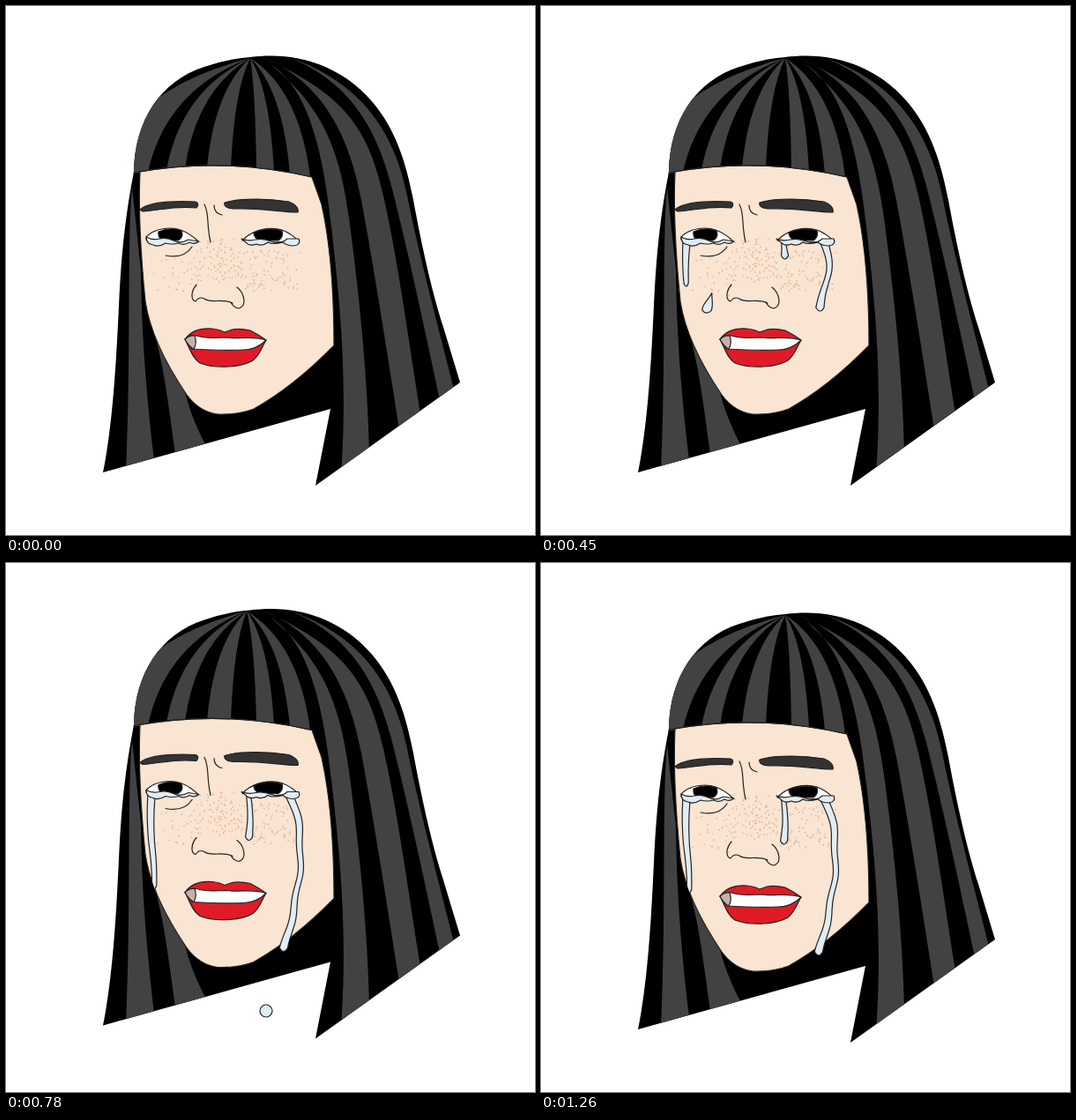
Recreate the animation shown at these times as an HTML page. Size 600 px wide and 600 px high, loop 1.29 s.

```html
<!DOCTYPE html>
<html lang="en">
<head>
<meta charset="utf-8">
<title>Crying face</title>
<style>
  html, body { margin: 0; width: 100%; height: 100%; overflow: hidden; background: #fff; }
  svg { display: block; width: 100%; height: 100%; }
  .grey { fill: #424242; }
  .skin { fill: #fae4d2; }
  .ink { stroke: #222; stroke-width: 1.2; stroke-linejoin: round; stroke-linecap: round; }
  .line { fill: none; }
  .tear { fill: #e1edf3; }
</style>
</head>
<body>
<svg viewBox="0 0 600 600">
  <defs>
    <path id="hair" d="M145 188C146 130 175 85 225 69Q250 60 277 58C330 51 380 68 414 107C443 140 454 180 462 220C474 285 485 330 496 364L515 427L351 544L368 457L110 529C121 475 125 405 128 340C131 275 136 235 145 188Z"/>
    <path id="face" d="M152 188C150 230 153 285 158 335C163 368 180 404 205 441Q219 460 240 463Q262 464 281 457Q326 432 372 385C372 330 368 270 358 225L347 194Q246 171 152 188Z"/>
    <clipPath id="inHair"><use href="#hair"/></clipPath>
    <clipPath id="inFace"><use href="#face"/></clipPath>
  </defs>
  <g id="head">
    <use href="#hair"/>
    <g clip-path="url(#inHair)" class="grey">
      <path d="M300 66C345 95 360 170 369 250S388 420 380 530L412 505C410 420 401 330 389 240S352 110 300 66Z"/>
      <path d="M290 58C360 85 390 150 403 220S432 390 446 480L470 462C458 390 445 290 428 215S385 100 290 58Z"/>
      <path d="M320 58C390 85 420 140 436 200S478 380 492 447L508 435C492 370 470 290 455 215S400 85 320 58Z"/>
      <path d="M143 205C137 270 142 400 136 525L168 515C158 430 154 370 153 300Z"/>
      <path d="M166 365C178 400 184 450 192 508L226 497C212 470 206 450 203 438Z"/>
      <path id="fringe"/>
    </g>
    <use href="#face" class="skin ink"/>
    <path class="ink line" d="M145 189Q246 170.500 347 194"/>
    <g id="freckles" stroke="#d8ab87" stroke-width="1.3" stroke-linecap="round" opacity=".75"></g>

    <g fill="#333" class="ink">
      <path d="M152 231C162 222 190 221 215 222Q220 224 216 229C192 226 174 232 155 233Z"/>
      <path d="M248 223C268 217 300 219 321 222Q333 227 331 234C312 234 288 229 262 230Q246 230 248 223Z"/>
    </g>
    <g class="ink line">
      <path d="M225 225C231 236 227 247 232 268M236 226Q236 235 245 237M181 283Q202 287 211 273"/>
      <path d="M216 316C210 323 209 333 215 335Q219 329 225 332C232 338 246 331 257 337M262 319C270 325 274 340 264 343Q258 342 255 336"/>
    </g>

    <g class="ink">
      <path fill="#fff" d="M159 262C168 252 187 250 198 254Q209 258 218 267Q190 270 159 265Z"/>
      <path fill="#000" d="M173 256Q187 250 199 255Q202 262 195 266H178Q172 263 173 256Z"/>
      <path fill="#fff" d="M268 266C280 253 300 250 313 254Q325 259 331 266Q300 270 268 266Z"/>
      <path fill="#000" d="M281 257Q298 250 313 255Q315 262 309 266H288Q281 263 281 257Z"/>
    </g>

    <g class="ink tear">
      <path clip-path="url(#inFace)" id="left"/>
      <path id="mid"/>
      <path id="right"/>
      <g clip-path="url(#inFace)"><path id="roll" d="M3 -13C4 -5 7 1 5 7Q0 13 -5 8C-7 2 0 -4 3 -13Z"/></g>
      <path d="M159 262Q166 266 174 264T190 266T207 265L219 267Q214 271 208 268Q202 272 196 269Q188 271 181 269Q173 274 167 271Q159 270 159 262Z"/>
      <path d="M267 264Q275 267 283 265T301 267T319 264L332 264Q335 271 326 272Q319 272 314 268Q303 271 297 268Q291 273 284 270Q276 273 272 268Z"/>
    </g>

    <g class="ink">
      <path fill="#df1b27" d="M203 378C210 368 222 365 234 366Q243 367 248 370C256 366 268 366 277 368Q287 373 295 379C290 387 288 396 280 402C265 411 235 411 220 405C211 399 208 387 203 378Z"/>
      <path fill="#fff" d="M203 378Q209 373 216 374C228 378 240 376 250 376C268 378 282 374 295 379Q284 390 269 390C248 391 228 390 211 389Z"/>
      <path fill="#c2b2aa" d="M203 378Q208 373 214 374Q217 382 213 389Q207 386 203 378Z"/>
    </g>
  </g>
  <circle id="drip" class="ink tear"/>
</svg>
<script>
const STEP = 30, STEPS = 43;
const $ = id => document.getElementById(id);
const clamp = v => Math.max(0, Math.min(1, v));

// Piecewise linear track of [time, value] pairs.
function track(keys, t) {
  let i = 1;
  while (i < keys.length - 1 && t > keys[i][0]) i++;
  const [a, x] = keys[i - 1], [b, y] = keys[i];
  return x + (y - x) * clamp((t - a) / (b - a));
}

function fringe(peak) {
  const edge = x => {
    const u = (x - 145) / 202;
    const y = 189 * (1 - u) ** 2 + 341 * u * (1 - u) + 194 * u * u;
    return { x, y: Math.min(y, 192) + 2, cx: peak + (x - peak) * .82 };
  };
  return [[105, 161], [182, 203], [228, 255], [284, 304], [322, 345]].map(([l, r]) => {
    const a = edge(l), b = edge(r);
    return `M${peak} 59Q${a.cx} 95 ${a.x} ${a.y}L${b.x} ${b.y}Q${b.cx} 95 ${peak} 59Z`;
  }).join('');
}

// A tear running down from y0 to y1 along centre(u), half as wide as width(u).
function stream(y0, y1, centre, width) {
  const len = y1 - y0;
  if (len < 3) return '';
  const n = Math.ceil(len / 5), l = [], r = [];
  for (let i = 0; i <= n; i++) {
    const u = i / n, y = y0 + u * (len - 4), x = centre(u, y), w = width(u);
    l.push(`${(x - w).toFixed(1)} ${y.toFixed(1)}`);
    r.unshift(`${(x + w).toFixed(1)} ${y.toFixed(1)}`);
  }
  const [ex, ey] = r[0].split(' ');
  return `M${l.join('L')}Q${centre(1, y1)} ${y1 + 4} ${ex} ${ey}L${r.join('L')}Z`;
}

function addFreckles() {
  let seed = 7, d = '';
  const rnd = () => (seed = seed * 16807 % 2147483647) / 2147483647;
  for (let i = 0; i < 210; i++) {
    const x = 167 + 88 * (rnd() + rnd());
    const top = x < 215 ? 284 : x < 268 ? 264 : 277;
    const y = top + rnd() * (x > 215 && x < 268 ? 50 : 46);
    d += `M${x.toFixed(1)} ${y.toFixed(1)}l${(rnd() * 1.6 - .8).toFixed(1)} ${(rnd() * 1.4).toFixed(1)}`;
  }
  $('freckles').innerHTML = `<path d="${d}"/>`;
}

const bobs = [0, .5, 1];
const drips = [
  { from: 720, to: 810, x: 295, y: 446, r: 7 },
  { from: 900, to: 990, x: 191, y: 425, r: 5 }
];

function draw(step) {
  const t = step * STEP, bob = bobs[step % 3];
  $('head').setAttribute('transform', `translate(0 ${-4.5 * bob})`);
  $('fringe').setAttribute('d', fringe(277 - 4 * bob));

  const leftEnd = track([[310, 268], [450, 318], [600, 352], [780, 374]], t);
  $('left').setAttribute('d', stream(266, leftEnd,
    (u, y) => 165 + Math.sin(y / 17) + Math.max(0, y - 320) * .06,
    u => 4.2 - 1.6 * u));

  const midEnd = track([[330, 268], [450, 287], [600, 306], [780, 319]], t);
  $('mid').setAttribute('d', stream(268, midEnd,
    (u, y) => 276 + Math.sin(y / 11),
    u => 2.6 + 1.4 * u * u));

  const rightEnd = track([[300, 268], [450, 346], [600, 428], [660, 445]], t);
  const bulge = 13 * (rightEnd - 268) / 160;
  $('right').setAttribute('d', stream(268, rightEnd,
    (u, y) => 322 - 6 * u + bulge * Math.sin(Math.PI * u ** .8) + 1.2 * Math.sin(y / 9),
    u => 4.6 - 1.6 * Math.sin(Math.PI * u)));

  const x = track([[210, 207], [270, 204], [450, 189], [600, 178], [690, 172]], t);
  const y = track([[210, 268], [270, 277], [450, 338], [600, 388], [690, 412]], t);
  const size = clamp((t - 180) / 90);
  $('roll').setAttribute('transform', `translate(${x} ${y}) rotate(8) scale(${size})`);
  $('roll').style.display = t > 180 && t < 690 ? '' : 'none';

  const drip = drips.find(d => t >= d.from && t < d.to);
  $('drip').style.display = drip ? '' : 'none';
  if (drip) {
    const fall = (t - drip.from) / 60;
    $('drip').setAttribute('cx', drip.x);
    $('drip').setAttribute('cy', drip.y + (drip.r > 6 ? 62 : 52) * fall);
    $('drip').setAttribute('r', drip.r);
  }
}

addFreckles();
draw(0);
const start = performance.now();
let last = 0;
(function tick() {
  const step = Math.floor((performance.now() - start) / STEP) % STEPS;
  if (step !== last) draw(last = step);
  requestAnimationFrame(tick);
})();
</script>
</body>
</html>
```
